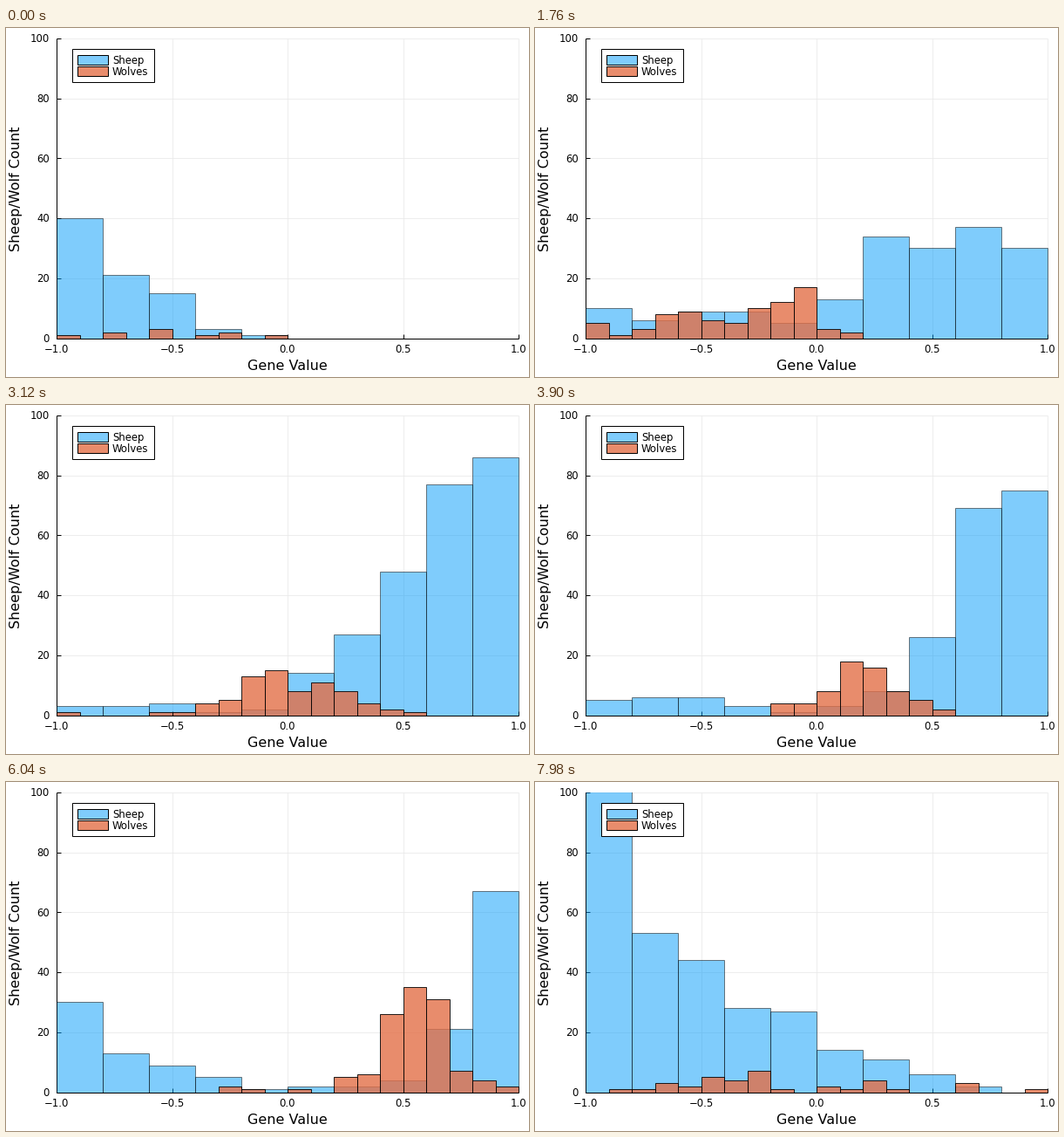
A matplotlib script that plays this animation: 600x400 px, repeating every 8 s.

```python
import numpy as np
import matplotlib.pyplot as plt
from matplotlib.animation import FuncAnimation
from matplotlib.patches import Rectangle

W, H, DPI = 600, 400, 100
STEP, FRAMES = 20, 400
LEFT, RIGHT, TOP, BASE = 58, 588, 12, 355.5
PX = 72 / DPI

TIMES = np.array([0, 1100, 2380, 3900, 4720, 6040, 7980])

SHEEP = np.array([
    [40, 21, 15, 3, 1, 0, 0, 0, 0, 0],
    [92, 24, 16, 20, 8, 6, 13, 6, 4, 2],
    [1, 0, 1, 0, 3, 20, 49, 53, 65, 63],
    [5, 6, 6, 3, 1, 3, 8, 26, 69, 75],
    [3, 4, 2, 3, 4, 5, 11, 16, 62, 71],
    [30, 13, 9, 5, 1, 2, 2, 4, 21, 67],
    [115, 53, 44, 28, 27, 14, 11, 6, 2, 0],
])

# first occupied bin, then the counts from there on
WOLF_RUNS = [
    (0, [1, 0, 2, 0, 3, 0, 1, 2, 0, 1]),
    (0, [11, 2, 7, 17, 16, 9, 4, 8, 5, 5]),
    (0, [2, 0, 0, 0, 2, 2, 6, 10, 22, 28, 8, 5]),
    (8, [4, 4, 8, 18, 16, 8, 5, 2]),
    (9, [2, 3, 13, 14, 22, 21, 12]),
    (7, [2, 1, 0, 1, 0, 5, 6, 26, 35, 31, 7, 4, 2]),
    (1, [1, 1, 3, 2, 5, 4, 7, 1, 0, 2, 1, 4, 1, 0, 0, 3, 0, 0, 1]),
]
WOLVES = np.zeros((len(TIMES), 20))
for row, (first, run) in zip(WOLVES, WOLF_RUNS):
    row[first:first + len(run)] = run

# herd booms and busts: start, end, size, gene value, spread
SURGES = [
    (20, 1100, 55, -0.9, 0.3),
    (1100, 2380, -35, -0.9, 0.15),
    (2380, 3400, 36, 0.9, 0.35),
    (4900, 5800, 28, 0.9, 0.2),
    (6500, 7980, 25, -0.9, 0.2),
]

rng = np.random.default_rng(4)


def make_noise(n):
    return rng.uniform(0, 2 * np.pi, (2, n)), rng.uniform(0.012, 0.04, (2, n))


def counts_at(t, table, noise, surges=()):
    k = min(np.searchsorted(TIMES, t, side="right") - 1, len(TIMES) - 2)
    u = min((t - TIMES[k]) / (TIMES[k + 1] - TIMES[k]), 1)
    c = table[k] + (table[k + 1] - table[k]) * u
    n = len(c)
    genes = -1 + (np.arange(n) + 0.5) * 2 / n
    for start, end, size, gene, spread in surges:
        if start < t < end:
            pulse = np.sin(np.pi * (t - start) / (end - start)) ** 2
            c = c + size * pulse * np.exp(-((genes - gene) / spread) ** 2)
    c = np.maximum(c, 0)
    phase, speed = noise
    wobble = np.sin(phase + speed * t).sum(axis=0)
    c = c + 0.3 * np.sqrt(c) * wobble * np.sin(np.pi * u)
    return np.maximum(np.round(c), 0)


def px_x(gene):
    return LEFT + (gene + 1) * (RIGHT - LEFT) / 2


def px_y(count):
    return BASE - count * (BASE - TOP) / 100


fig = plt.figure(figsize=(W / DPI, H / DPI), dpi=DPI, facecolor="white")
ax = fig.add_axes([0, 0, 1, 1])
ax.set_xlim(0, W)
ax.set_ylim(H, 0)
ax.axis("off")
plt.rcParams["font.family"] = "DejaVu Sans"


def line(xs, ys, color="black", width=1.0, z=2):
    ax.plot(xs, ys, color=color, lw=width * PX, zorder=z,
            solid_capstyle="butt")


def label(x, y, s, size=11.6, ha="center", **kw):
    ax.text(x, y, s, fontsize=size * PX, ha=ha, va="baseline", zorder=8, **kw)


def box(x, y, w, h, face, edge, z):
    return ax.add_patch(Rectangle((x, y), w, h, fc=face, ec=edge,
                                  lw=PX, zorder=z))


for gene in (-1, -0.5, 0, 0.5, 1):
    x = px_x(gene)
    line([x, x], [TOP, BASE], "#e9e9e9", 0.8, 1)
    line([x, x], [BASE - 5, BASE])
    label(x, 372, f"{gene:.1f}".replace("-", "\u2212"))
for count in range(0, 101, 20):
    y = px_y(count)
    line([LEFT, RIGHT], [y, y], "#e9e9e9", 0.8, 1)
    line([LEFT, LEFT + 5], [y, y])
    label(50, y + 4.3, str(count), ha="right")
line([LEFT, LEFT], [TOP, BASE + 0.5])
line([LEFT, RIGHT], [BASE, BASE])
label(323, 392, "Gene Value", 16)
label(16.5, 184, "Sheep/Wolf Count", 16, rotation=90, rotation_mode="anchor")

SHEEP_FILL, SHEEP_EDGE = (0, 0.604, 0.98, 0.5), (0, 0, 0, 0.5)
WOLF_FILL, WOLF_EDGE = (0.89, 0.435, 0.278, 0.8), (0, 0, 0, 0.85)

box(76, 23.5, 94, 38.5, "white", "black", 6)
for y, name, fill in ((31, "Sheep", SHEEP_FILL), (44, "Wolves", WOLF_FILL)):
    box(81.5, y, 35.5, 10.5, fill, "black", 7)
    label(122, y + 9.7, name, ha="left")

frame_area = Rectangle((LEFT - 0.5, TOP - 0.5), RIGHT - LEFT + 1.5,
                       BASE - TOP + 1, transform=ax.transData)


def make_bars(n, fill, edge, z):
    w = (RIGHT - LEFT) / n
    bars = [box(LEFT + i * w, BASE, w, 0, fill, edge, z) for i in range(n)]
    for bar in bars:
        bar.set_clip_path(frame_area)
    return bars


def set_bars(bars, counts):
    for bar, c in zip(bars, counts):
        bar.set_height(px_y(c) - BASE)
        bar.set_visible(c > 0)


sheep_bars = make_bars(10, SHEEP_FILL, SHEEP_EDGE, 3)
wolf_bars = make_bars(20, WOLF_FILL, WOLF_EDGE, 4)
sheep_noise, wolf_noise = make_noise(10), make_noise(20)


def draw(i):
    t = i * STEP
    set_bars(sheep_bars, counts_at(t, SHEEP, sheep_noise, SURGES))
    set_bars(wolf_bars, counts_at(t, WOLVES, wolf_noise))
    return sheep_bars + wolf_bars


anim = FuncAnimation(fig, draw, frames=FRAMES, interval=STEP, repeat=True,
                     repeat_delay=0, init_func=lambda: draw(0))
plt.show()
```
